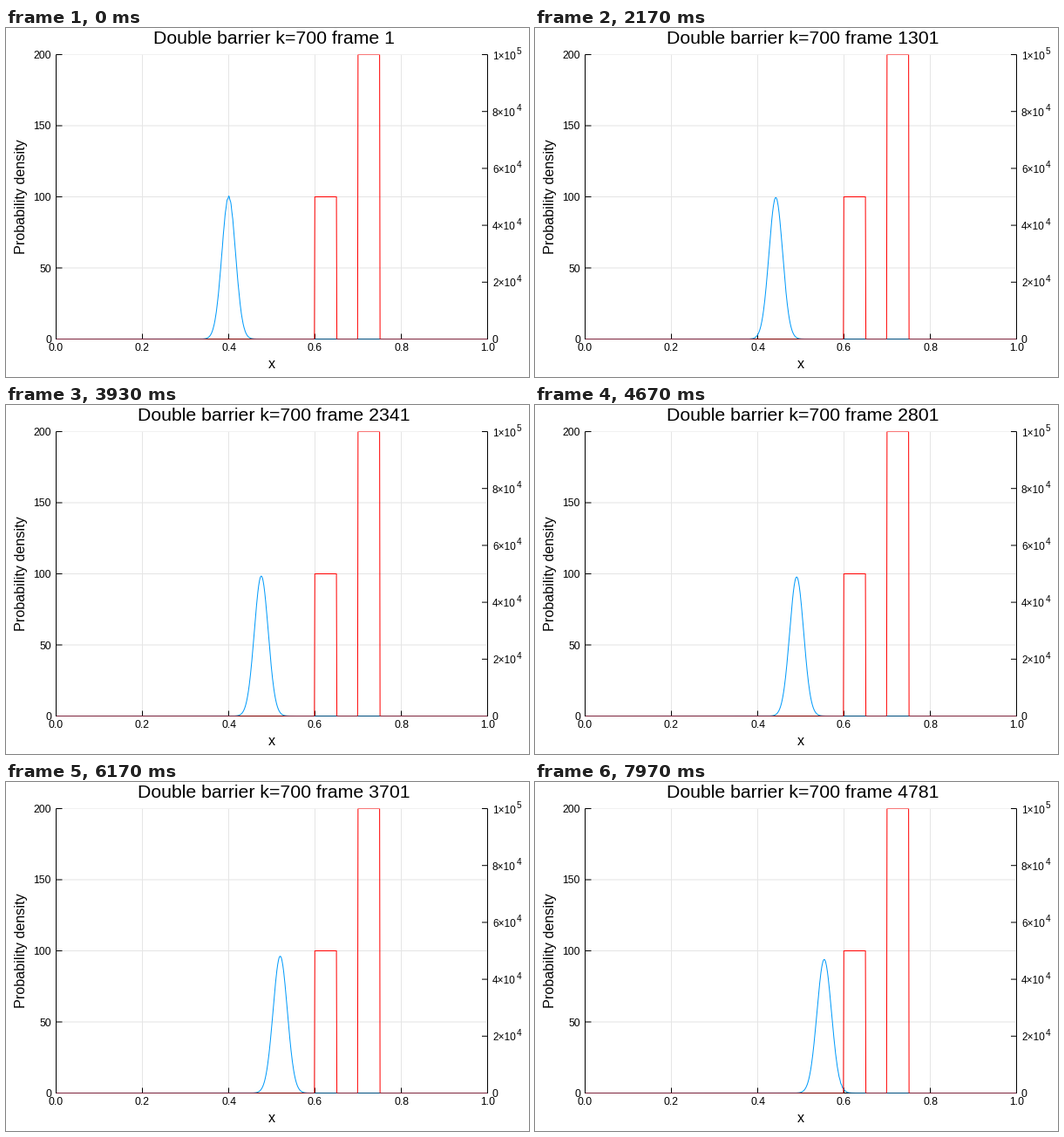
A matplotlib script for the animation above (8 s loop, 600 by 400 pixels).

```python
import numpy as np
import matplotlib.pyplot as plt
from matplotlib.animation import FuncAnimation
from matplotlib.path import Path

W, H, DPI = 600, 400, 100
PT = 72 / DPI                      # points per pixel
LEFT, RIGHT, TOP, BOTTOM = 57.5, 552.5, 30.5, 356.5
FRAMES, LOOP = 240, 8000
STEPS = 20                         # solver steps between pictures

plt.rcParams["font.family"] = "Liberation Sans"

# Leapfrog solution of the Schroedinger equation with two barriers
N, DX, DT, K = 1000, 1e-3, 5e-8, 700
x = np.linspace(0, 1, N)
barrier = np.zeros(N)
barrier[599:650] = 5e4
barrier[699:750] = 1e5


def hamiltonian(f):
    out = barrier * f
    out[1:-1] -= (f[2:] - 2 * f[1:-1] + f[:-2]) / (2 * DX**2)
    return out


def solve():
    packet = 10 * np.exp(-(x - 0.4) ** 2 / 1e-3)
    re, im = packet * np.cos(K * x), packet * np.sin(K * x)
    densities = []
    for step in range((FRAMES - 1) * STEPS + 1):
        re = re + DT * hamiltonian(im)
        new_im = im - DT * hamiltonian(re)
        if step % STEPS == 0:
            densities.append(re**2 + im * new_im)
        im = new_im
    return densities


def px(v):
    return LEFT + v * (RIGHT - LEFT)


def py(v, top):
    return BOTTOM - v / top * (BOTTOM - TOP)


fig = plt.figure(figsize=(W / DPI, H / DPI), dpi=DPI, facecolor="white")
ax = fig.add_axes([0, 0, 1, 1])
ax.set_xlim(0, W)
ax.set_ylim(H, 0)
ax.axis("off")

# Smooth-edged clip: lines on the border keep half their width
window = Path([(LEFT, TOP), (RIGHT, TOP), (RIGHT, BOTTOM), (LEFT, BOTTOM),
               (LEFT, TOP)], closed=True)


def line(xs, ys, color="black", z=3, clip=False):
    item = ax.plot(xs, ys, color=color, lw=PT, zorder=z, snap=False,
                   solid_capstyle="butt")[0]
    if clip:
        item.set_clip_path(window, ax.transData)
    return item


def label(xp, yp, s, size, ha="center", **kw):
    return ax.text(xp, yp, s, fontsize=size * PT, ha=ha, va="baseline", **kw)


TICK, GUIDE, TITLE = 12.2, 16.1, 21.25
GRID = "#e5e5e5"

# Bottom axis: ticks, grid, labels
for i in range(6):
    xp = px(i / 5)
    if 0 < i < 5:
        line([xp, xp], [TOP, BOTTOM], GRID, 1, clip=True)
    line([xp, xp], [BOTTOM, BOTTOM - 6])
    label(xp, 370.5, f"{i / 5:.1f}", TICK)

# Left axis
for v in range(0, 201, 50):
    yp = py(v, 200)
    if v:
        line([LEFT, RIGHT], [yp, yp], GRID, 1, clip=True)
    line([LEFT, LEFT + 7], [yp, yp])
    label(52, yp + 4.5, str(v), TICK, "right")

# Right axis, with raised exponents
for v in range(0, 11, 2):
    yp = py(v, 10)
    line([RIGHT, RIGHT - 6.5], [yp, yp])
    if v == 0:
        label(558, yp + 4.5, "0", TICK, "left")
        continue
    mantissa, power = ("1", "5") if v == 10 else (str(v), "4")
    label(558, yp + 5, mantissa + "×10", 11.9, "left")
    label(585.8, yp - 0.5, power, 10, "left")

line([LEFT, LEFT], [TOP, BOTTOM + 0.5])
line([RIGHT, RIGHT], [TOP, BOTTOM + 0.5])
line([LEFT, RIGHT], [BOTTOM, BOTTOM])

label(305, 390, "x", GUIDE)
label(22.4, 192.9, "Probability density", GUIDE, rotation=90,
      rotation_mode="anchor")
title = label(307.3, 18.3, "", TITLE)

density = solve()
wave = line(px(x), py(density[0], 200), "#009afa", 4, clip=True)
line(px(x), py(barrier, 1e5), "red", 5, clip=True)


def update(n):
    wave.set_ydata(py(density[n], 200))
    title.set_text(f"Double barrier k=700 frame {1 + STEPS * n}")
    return wave, title


anim = FuncAnimation(fig, update, frames=FRAMES, init_func=lambda: update(0),
                     interval=LOOP / FRAMES, repeat=True, repeat_delay=0)
plt.show()
```
